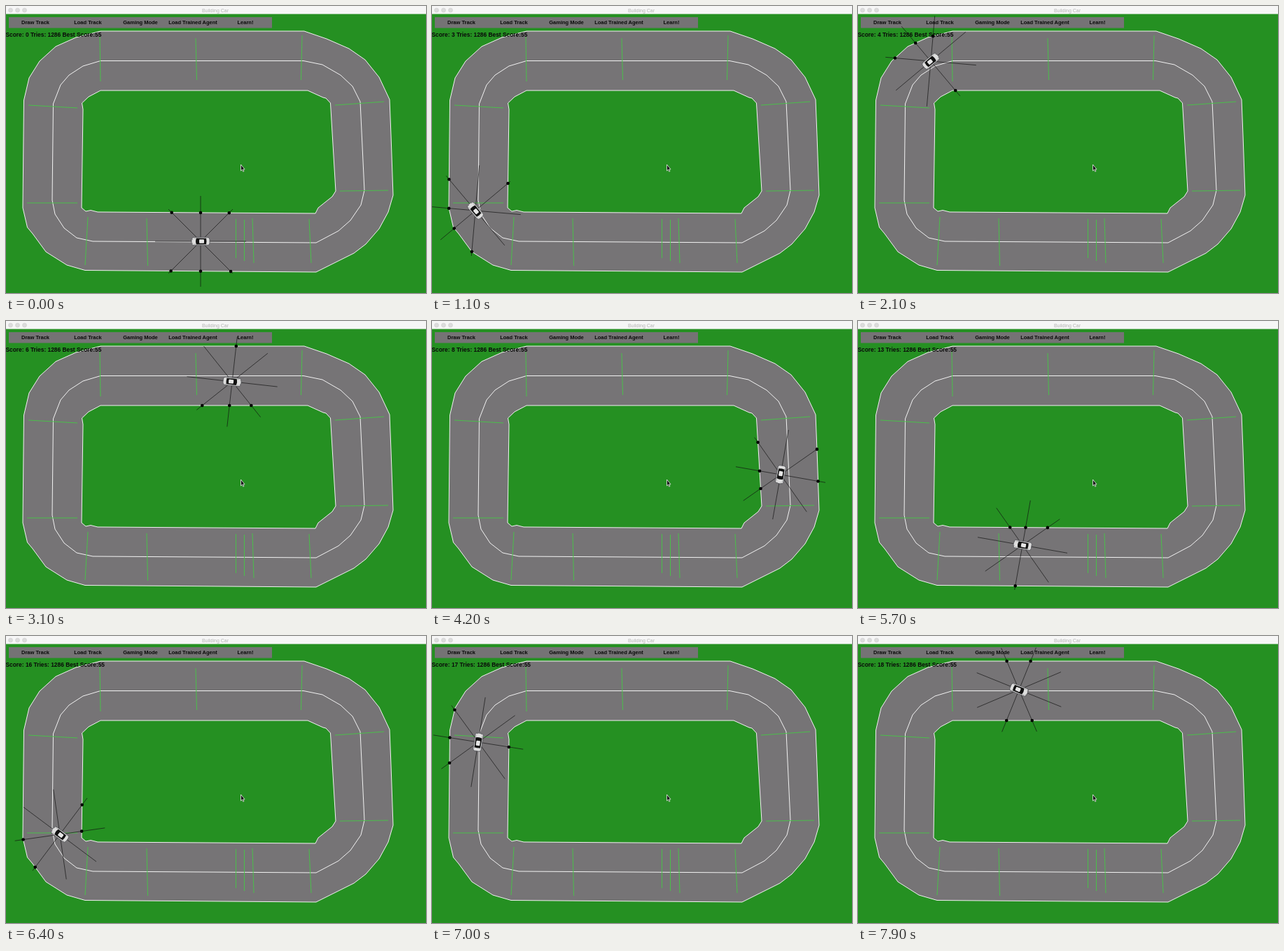
These frames come from a looping animation (600 px wide and 411 px high, 8 s). An HTML page:

```html
<!DOCTYPE html>
<html lang="en">
<head>
<meta charset="utf-8">
<title>Building Car</title>
<style>
  html, body { margin: 0; width: 100%; height: 100%; overflow: hidden; background: #259022; }
  svg { display: block; width: 600px; height: 411px; }
  text { font-family: "Liberation Sans", Arial, sans-serif; font-weight: bold; fill: #0a0a0a; }
  .menu text { font-size: 7.5px; text-anchor: middle; }
  .edge { stroke: #f2f2f2; stroke-width: 1; }
  .gates { stroke: #46c846; stroke-width: .9; fill: none; }
  #rays { stroke: #111; stroke-width: .9; stroke-opacity: .75; }
</style>
</head>
<body>
<svg viewBox="0 0 600 411">
  <rect width="600" height="411" fill="#259022"/>

  <polygon id="outer" class="edge" fill="#767476" points="135,36 426,36 458,47 490,61 513,77 533,102 548,134 550,185 553,271 546,295 533,319 514,341 497,354 443,381 113,378.5 87,371 57,352 38,326 30.5,317 24,289 25.5,135 33,103 48,79 71,58 100,45"/>
  <polygon class="edge" fill="none" points="135,78.5 425,78.5 452,84 478,99 495,115 506,137 512,264 507,285 492,307 475,322 443,339 124,337 101,332 83,318 70,298 66,278 67.5,140 78,113 90,99 110,86"/>
  <polygon id="inner" class="edge" fill="#259022" points="135,121 431,121 453,131 457,132 463.5,139 471,265 466,273 446,289 442,297 131,295 121,292.5 114,294 108,289 110,148 108.5,139 118,130"/>

  <path class="gates" d="M201 304L202.500 372M117 302L113 371M30 282H102M32 142L102 146M134 44L135 108M271 46L272.500 106M423 42L421.500 106M470 142L540 137M477 265L546 264M433 305L436 368M352 304L354 368M340.500 306V365M328.500 305V361"/>

  <g class="menu">
    <rect x="4" y="16" width="376" height="15.500" fill="#757375"/>
    <text x="42" y="26">Draw Track</text>
    <text x="117" y="26">Load Track</text>
    <text x="192" y="26">Gaming Mode</text>
    <text x="267" y="26">Load Trained Agent</text>
    <text x="342" y="26">Learn!</text>
  </g>
  <text id="score" x="-.5" y="43.500" font-size="8.400"></text>

  <path id="rays"/>
  <g id="car">
    <rect x="-13" y="-5.800" width="26" height="11.600" rx="3.500" fill="#dedede" stroke="#55555a" stroke-width=".9"/>
    <path d="M-10 -4.200H10M-10 4.200H10" stroke="#aaa" stroke-width=".8"/>
    <path d="M6 -4.600Q8 0 6 4.600L-8 4.200Q-9 0 -8 -4.200Z" fill="#111"/>
    <rect x="-5" y="-2.800" width="7" height="5.600" rx="1" fill="#e6e6e6"/>
    <path d="M12 -4V-2M12 2V4" stroke="#777"/>
  </g>
  <path id="dots" stroke="#000" stroke-width="4.600" stroke-linecap="round"/>

  <path d="M335.500 227V236L337.400 234.300L338.700 237.200L340 236.500L338.700 233.800H341Z" fill="#111" stroke="#eee" stroke-width=".8"/>

  <rect width="600" height="11.500" fill="#f6f6f6"/>
  <g fill="#dcdcdc" stroke="#c8c8c8" stroke-width=".5">
    <circle cx="6.500" cy="6" r="3"/><circle cx="16.500" cy="6" r="3"/><circle cx="26.500" cy="6" r="3"/>
  </g>
  <text x="299" y="8.500" text-anchor="middle" font-size="7" style="font-weight:normal;fill:#b4b4b4">Building Car</text>
</svg>

<script>
const STEP = 100, STEPS = 80, REACH = 65;
const el = id => document.getElementById(id);

// step, x, y, heading in degrees
const route = [
  [0, 278, 337, 180], [4, 200, 337, 180], [7, 139, 336, 183], [9, 97, 324, 205],
  [11, 62, 293, 230], [13, 44, 251, 258], [16, 45, 183, 278], [19, 74, 117, 302],
  [21, 104, 79, 320], [24, 165, 58, 352], [28, 255, 78, 375], [32, 346, 90, 366],
  [36, 439, 107, 394], [39, 486, 155, 430], [42, 498, 220, 460], [45, 487, 288, 463],
  [47, 459, 323, 500], [49, 416, 338, 530], [53, 324, 336, 542], [55, 279, 329, 549],
  [57, 235, 321, 550], [60, 162, 311, 546], [63, 95, 298, 560], [65, 64, 265, 597],
  [67, 57, 220, 627], [70, 66, 152, 639], [73, 95, 91, 672], [75, 138, 65, 702],
  [77, 184, 62, 727], [79, 230, 77, 742]
];
// steps at which the car reaches a gate
const gateSteps = [4, 8, 11, 18, 23, 29, 35, 38, 44, 48, 52, 52, 53, 58, 62, 64, 70, 75];

const walls = ["outer", "inner"].flatMap(id => {
  const pts = el(id).getAttribute("points").split(" ").map(p => p.split(",").map(Number));
  return pts.map((p, i) => [p, pts[(i + 1) % pts.length]]);
});

function slope(i, k) {
  const a = route[Math.max(i - 1, 0)], b = route[Math.min(i + 1, route.length - 1)];
  return (b[k] - a[k]) / (b[0] - a[0]);
}

// cubic Hermite interpolation of x, y and heading
function poseAt(step) {
  let i = 0;
  while (i < route.length - 2 && route[i + 1][0] <= step) i++;
  const a = route[i], b = route[i + 1], span = b[0] - a[0], u = (step - a[0]) / span;
  const ease = u * u * (3 - 2 * u);
  return [1, 2, 3].map(k =>
    a[k] + (b[k] - a[k]) * ease +
    span * u * (1 - u) * ((1 - u) * slope(i, k) - u * slope(i + 1, k)));
}

// distance along a ray to the nearest wall
function hit(x, y, dx, dy) {
  let best = Infinity;
  for (const [[ax, ay], [bx, by]] of walls) {
    const ex = bx - ax, ey = by - ay, det = dx * ey - dy * ex;
    if (!det) continue;
    const d = ((ax - x) * ey - (ay - y) * ex) / det;
    const s = ((ax - x) * dy - (ay - y) * dx) / det;
    if (d > 0 && s >= 0 && s <= 1) best = Math.min(best, d);
  }
  return best;
}

function draw(step) {
  const [x, y, heading] = poseAt(step);
  let rays = "", dots = "";
  for (let i = 0; i < 8; i++) {
    const a = (heading + i * 45) * Math.PI / 180, dx = Math.cos(a), dy = Math.sin(a);
    const at = d => `${(x + dx * d).toFixed(2)} ${(y + dy * d).toFixed(2)}`;
    rays += `M${at(0)}L${at(REACH)}`;
    const d = hit(x, y, dx, dy);
    if (d <= REACH) dots += `M${at(d)}h.01`;
  }
  el("rays").setAttribute("d", rays);
  el("dots").setAttribute("d", dots);
  el("car").setAttribute("transform", `translate(${x} ${y}) rotate(${heading})`);
  const score = gateSteps.filter(s => s <= step).length;
  el("score").textContent = `Score: ${score} Tries: 1286 Best Score:55`;
}

const start = performance.now();
function tick() {
  draw(Math.floor((performance.now() - start) / STEP) % STEPS);
  requestAnimationFrame(tick);
}
tick();
</script>
</body>
</html>
```
